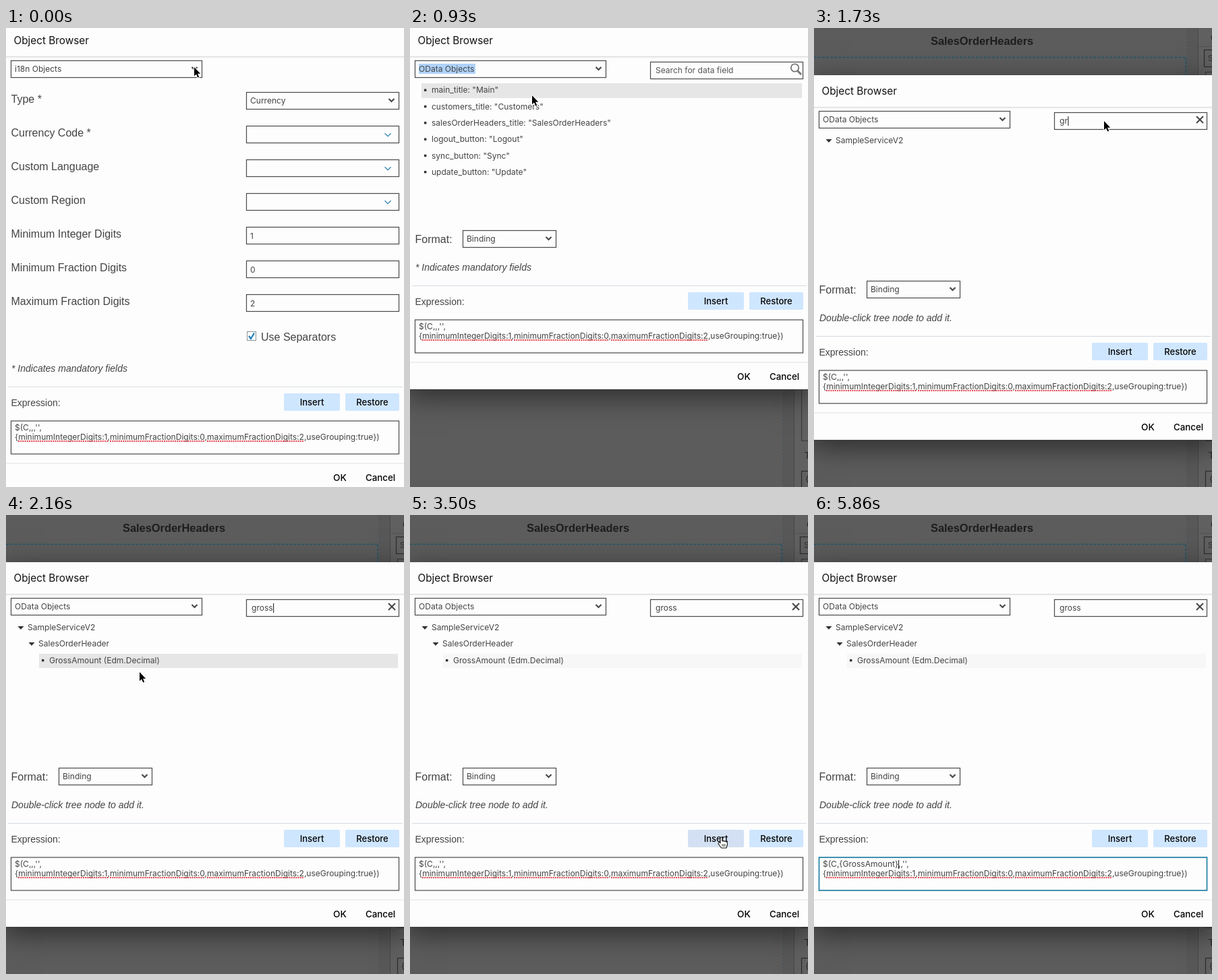
Animation, 590 px wide and 681 px high, one loop 6 s. Source, as an HTML page with a canvas:

```html
<!DOCTYPE html>
<html lang="en">
<head>
<meta charset="utf-8">
<title>Object Browser</title>
<style>
html, body { margin: 0; width: 100%; height: 100%; overflow: hidden; background: #5c5c5c; }
canvas { display: block; width: 590px; height: 681px; }
</style>
</head>
<body>
<canvas id="stage"></canvas>
<script>
const W = 590, H = 681, LOOP = 6000;
const canvas = document.getElementById('stage');
const ctx = canvas.getContext('2d');
const ratio = window.devicePixelRatio || 1;
canvas.width = W * ratio;
canvas.height = H * ratio;

const UI = 'Inter, "Open Sans", sans-serif';
const ARIAL = '"Liberation Sans", Arial, sans-serif';
const INK = '#444';
const SMALL = 12.04;

// y is the middle of the capital letters
function text(s, x, y, size = SMALL, color = INK, family = UI, style = '') {
  ctx.font = `${style} ${size}px ${family}`;
  ctx.fillStyle = color;
  ctx.fillText(s, x, y + size * 0.36);
}

function rect(x, y, w, h, color) {
  ctx.fillStyle = color;
  ctx.fillRect(x, y, w, h);
}

function box(x, y, w, h, color = '#4a4a4a', width = 1.2) {
  ctx.strokeStyle = color;
  ctx.lineWidth = width;
  ctx.strokeRect(x + 0.5, y + 0.5, w, h);
}

function path(points, color, width, dash = []) {
  ctx.strokeStyle = color;
  ctx.lineWidth = width;
  ctx.setLineDash(dash);
  ctx.beginPath();
  points.forEach(([x, y]) => ctx.lineTo(x, y));
  ctx.stroke();
  ctx.setLineDash([]);
}

function chevron(x, y, color = '#4a4a4a', width = 2.2, r = 4) {
  path([[x - r, y - r / 2], [x, y + r / 2], [x + r, y - r / 2]], color, width);
}

function select(x, y, w, label) {
  box(x, y, w, 25);
  text(label, x + 6, y + 13);
  chevron(x + w - 10.5, y + 12);
}

function button(x, y, w, label, hover) {
  ctx.fillStyle = hover ? '#d3e0f3' : '#cfe6ff';
  ctx.beginPath();
  ctx.roundRect(x, y, w, 26, 2);
  ctx.fill();
  ctx.textAlign = 'center';
  text(label, x + w / 2, y + 13, 13, '#000', UI, '500');
  ctx.textAlign = 'left';
}

function backdrop() {
  rect(0, 0, W, H, '#5c5c5c');
  rect(554, 0, 15, H, '#585858');
  rect(570, 0, 20, H, '#606060');
  text('SalesOrderHeaders', 173, 19.5, 16.4, '#1d1d1d', ARIAL, 'bold');
  path([[0, 43.5], [551, 43.5]], '#24566a', 1.6, [4, 2]);
  path([[551, 43.5], [551, 72]], '#24566a', 1.6, [4, 2]);
  path([[553.5, 0], [553.5, H]], '#4a545b', 1.2, [3, 2]);
  path([[569.5, 0], [569.5, H]], '#494949', 1);
  path([[570, 27.5], [590, 27.5]], '#535353', 1);
  text('c', 588, 13, 14, '#2b2b2b', ARIAL);
  box(578, 32, 20, 25, '#2c2c2c');
  text('S', 584, 45, 12, '#303030');
  box(580, 65, 20, 547, '#3c3c3c');
  text('T', 584.5, 634, 15, '#2a2a2a', ARIAL);
  box(580, 657, 20, 40, '#2c2c2c');
  text('{', 586, 669, 12, '#2a2a2a');
}

function panel(top, height) {
  ctx.save();
  ctx.shadowColor = 'rgba(0,0,0,.55)';
  ctx.shadowBlur = 40 * ratio;
  ctx.shadowOffsetY = 10 * ratio;
  rect(-6, top, W + 12, height, '#fdfdfd');
  ctx.restore();
  rect(0, top + height, W, 1, '#3d3d3d');
}

// Lower part of the dialog, shared by both layouts
function footer(y, s) {
  rect(3, y, 585, 1, '#d5dce3');
  text('Expression:', 7.5, y + 24, 14, INK, ARIAL);
  button(412, y + 10, 83, 'Insert', s.insertHover);
  button(503, y + 10, 80, 'Restore');
  if (s.inserted) box(7, y + 50.5, 575, 49, '#2c86a8', 1.8);
  else box(7, y + 50.5, 575, 49);
  const head = s.inserted ? '$(C,{GrossAmount}' : '$(C,';
  text(head + ",,'',", 13, y + 61);
  if (s.inserted) {
    ctx.font = `${SMALL}px ${UI}`;
    rect(13 + ctx.measureText(head).width, y + 55, 1, 13, '#111');
  }
  text('{minimumIntegerDigits:1,minimumFractionDigits:0,maximumFractionDigits:2,useGrouping:true})', 13, y + 75);
  [[18, 152], [154, 295], [298, 442]].forEach(([a, b]) =>
    path([[a, y + 81], [b, y + 81]], '#e2444c', 1.8, [2, 1.2]));
  rect(0, y + 113.5, W, 1, '#e2e2e2');
  text('OK', 485, y + 135.3, 13.6, s.okOff ? '#9a9a9a' : '#000', UI, '500');
  text('Cancel', 533, y + 135.3, 13.3, '#000', UI, '500');
}

function header() {
  text('Object Browser', 11.5, 18.3, 15.3, '#111');
  rect(0, 42, W, 1, '#d9d9d9');
  rect(0, 43, W, 2, '#f5f5f5');
}

function note(s, y) {
  text(s, 8, y, 14, INK, ARIAL, 'italic');
}

function formView(s) {
  panel(-5, 690);
  header();
  select(7, 48, 283, 'i18n Objects');
  const labels = ['Type *', 'Currency Code *', 'Custom Language', 'Custom Region',
    'Minimum Integer Digits', 'Minimum Fraction Digits', 'Maximum Fraction Digits'];
  labels.forEach((label, i) => {
    const y = 95 + i * 50;
    text(label, 7.5, y + 10, 16, INK, ARIAL);
    if (i === 0) select(356, y, 226, 'Currency');
    else box(356, y, 226, 25);
    if (i > 0 && i < 4) chevron(566, y + 13.5, '#2d7fae', 1.2, 4.5);
    if (i > 3) text('102'[i - 4], 362, y + 13.5);
  });
  box(357, 450, 13, 13, '#8c9299', 1);
  path([[360, 457], [363, 461], [368, 452.5]], '#2680bd', 2.3);
  text('Use Separators', 378, 458, 16, INK, ARIAL);
  note('* Indicates mandatory fields', 505);
  footer(532, s);
}

const ROWS = ['main_title: "Main"', 'customers_title: "Customers"',
  'salesOrderHeaders_title: "SalesOrderHeaders"', 'logout_button: "Logout"',
  'sync_button: "Sync"', 'update_button: "Update"'];

function bullet(x, y) {
  rect(x - 1.5, y - 1.5, 3.4, 3.4, '#333');
}

function triangle(x, y) {
  ctx.fillStyle = '#333';
  ctx.beginPath();
  ctx.moveTo(x - 4.5, y - 2);
  ctx.lineTo(x + 4.5, y - 2);
  ctx.lineTo(x, y + 3);
  ctx.fill();
}

function rowList(hover) {
  if (hover) rect(17, 82, 564, 22, '#e6e6e6');
  ROWS.forEach((row, i) => {
    const y = 92 + i * 24.3;
    bullet(22.5, y);
    text(row, 32, y);
  });
}

function tree(s) {
  triangle(22, 92);
  text('SampleServiceV2', 32, 92);
  if (!s.filtered) return;
  triangle(38, 116);
  text('SalesOrderHeader', 48, 116);
  rect(49, 131, 532, 21, s.rowHover ? '#e6e6e6' : '#f7f7f7');
  bullet(54.5, 140.5);
  text('GrossAmount (Edm.Decimal)', 64, 140.5);
}

function searchBox(s) {
  box(356, 50, 226, 25);
  if (!s.typed) {
    text('Search for data field', 364, 63, SMALL, '#555');
    ctx.strokeStyle = '#777';
    ctx.lineWidth = 1.8;
    ctx.beginPath();
    ctx.arc(570.5, 59, 5.7, 0, 7);
    ctx.stroke();
    path([[574.5, 63.5], [580, 69]], '#777', 3);
  } else {
    text(s.typed, 364, 63);
    path([[567, 56], [577, 66]], INK, 2);
    path([[577, 56], [567, 66]], INK, 2);
  }
  if (s.caret) {
    ctx.font = `${SMALL}px ${UI}`;
    rect(364.5 + ctx.measureText(s.typed).width, 56, 1, 14, '#111');
  }
}

function listView(s) {
  panel(s.shift - 5, 541);
  ctx.save();
  ctx.translate(0, s.shift);
  header();
  if (s.picked) rect(13, 53, 84, 15, '#afd2f9');
  select(7, 48, 283, 'OData Objects');
  if (s.focus) box(7, 48, 283, 25, '#3a8fc4', 1.8);
  searchBox(s);
  if (s.showTree) tree(s);
  else rowList(s.listHover);
  text('Format:', 7.5, 313, 16, INK, ARIAL);
  select(78, 300, 138, 'Binding');
  note(s.fresh ? '* Indicates mandatory fields' : 'Double-click tree node to add it.', 355);
  footer(382, s);
  ctx.restore();
}

// time, x, y of the pointer tip
const TRACK = [
  [0, 279, 58], [250, 279, 58], [450, 240, 74], [660, 240, 76],
  [930, 181, 100], [1030, 181, 100], [1260, 445, 75], [1430, 445, 75],
  [1630, 430, 138], [1960, 430, 138], [2160, 198, 233], [2330, 198, 233],
  [2550, 150, 216], [2700, 150, 216], [2930, 34, 520], [3060, 34, 520],
  [3460, 462, 479], [3800, 462, 479], [4330, 330, 560], [5000, 150, 634],
  [5060, 150, 634], [5460, 130, 700], [LOOP, 130, 700]
];

function pointerAt(t) {
  const i = TRACK.findIndex(k => k[0] > t);
  const [t0, x0, y0] = TRACK[i - 1], [t1, x1, y1] = TRACK[i];
  const p = (t - t0) / (t1 - t0), e = p * p * (3 - 2 * p);
  return [x0 + (x1 - x0) * e, y0 + (y1 - y0) * e];
}

const ARROW = new Path2D('M0 0V13.3L3 10.6 5.2 15.6 7.2 14.7 5.1 9.8H9.2Z');
const HAND = new Path2D('M-2 7V0Q-.5-2 1 0V5Q2.5 3.6 4 5.2 5.6 4.4 6.6 6 8.2 5.6 8.4 7.5V10L7 15H-.5L-4.8 9Q-5.4 7.6-4.6 7.2-3.6 6-2 8Z');

function pointer(t, hand) {
  const [x, y] = pointerAt(t);
  ctx.save();
  ctx.translate(x, y);
  ctx.lineJoin = 'round';
  if (hand) {
    ctx.fillStyle = '#fff';
    ctx.fill(HAND);
    ctx.strokeStyle = '#111';
    ctx.lineWidth = 1.1;
    ctx.stroke(HAND);
    [1, 3, 5].forEach(n => path([[n, 9], [n, 13]], '#222', 0.8));
  } else {
    ctx.strokeStyle = '#fff';
    ctx.lineWidth = 2;
    ctx.stroke(ARROW);
    ctx.fillStyle = '#000';
    ctx.fill(ARROW);
  }
  ctx.restore();
}

function stateAt(t) {
  const letters = Math.max(0, Math.min(5, Math.floor((t - 1560) / 70)));
  return {
    shift: t < 1120 ? 0 : t < 1430 ? 43 : 75,
    fresh: t < 1120,
    okOff: t >= 1120 && t < 1430,
    picked: t < 1430,
    focus: t >= 1120 && t < 1430,
    listHover: t >= 860 && t < 1080,
    showTree: t >= 1430,
    typed: 'gross'.slice(0, letters),
    caret: t >= 1630 && t < 2500,
    filtered: t >= 1960,
    rowHover: t >= 2100 && t < 2760,
    insertHover: t >= 3380 && t < 3900,
    inserted: t >= 3630
  };
}

function draw() {
  const t = performance.now() % LOOP;
  const s = stateAt(t);
  ctx.setTransform(ratio, 0, 0, ratio, 0, 0);
  backdrop();
  if (t < 700) formView(s);
  else listView(s);
  pointer(t, s.insertHover);
  requestAnimationFrame(draw);
}
draw();
</script>
</body>
</html>
```
